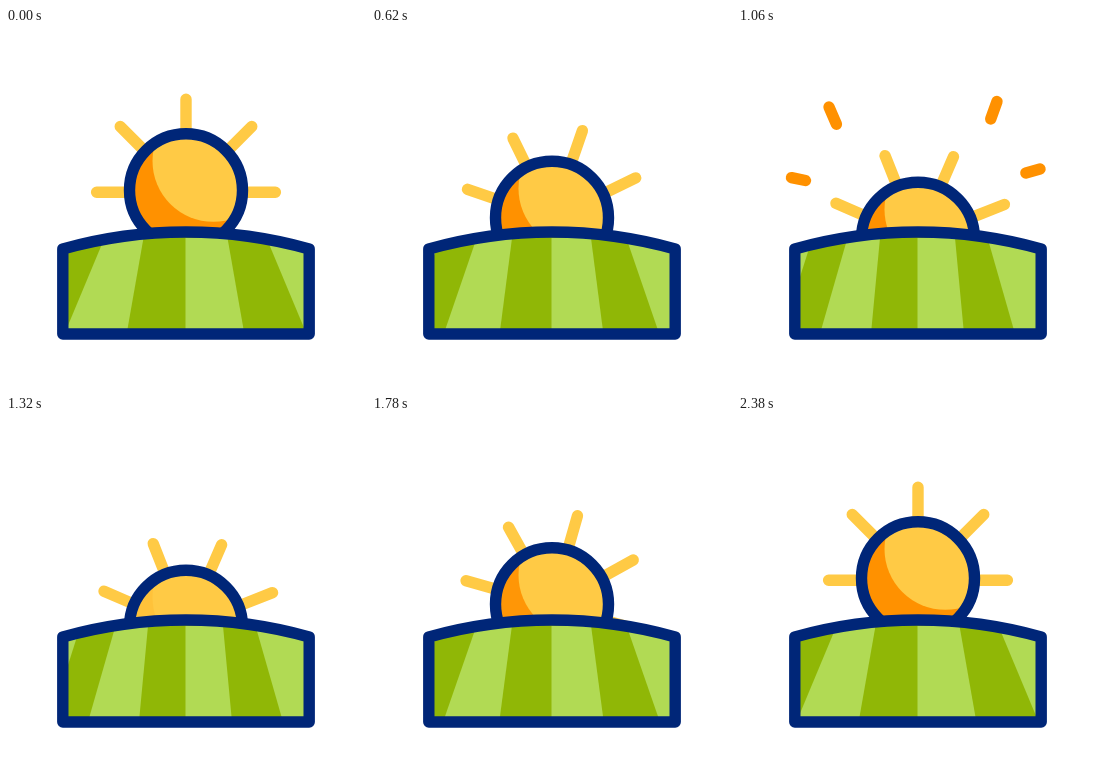
An HTML page with a canvas for the animation above (2.4 s loop, 360 by 360 pixels).

```html
<!DOCTYPE html>
<html lang="en">
<head>
<meta charset="utf-8">
<title>Sun over a field</title>
<style>
  html, body { margin: 0; width: 100%; height: 100%; overflow: hidden; background: #fff; }
  canvas { display: block; width: 100vw; height: 100vh; }
</style>
</head>
<body>
<canvas id="stage"></canvas>
<script>
const SIZE = 360, LOOP = 2400, PHASE = 6, LINE = 11.4, MID = 180;
const NAVY = '#002678', YELLOW = '#ffca45', ORANGE = '#ff9100';
const LIGHT = '#b1da54', DARK = '#90b706';

const canvas = document.getElementById('stage');
const ctx = canvas.getContext('2d');
const ratio = window.devicePixelRatio || 1;
canvas.width = canvas.height = SIZE * ratio;
ctx.scale(ratio, ratio);
ctx.lineCap = ctx.lineJoin = 'round';
ctx.lineWidth = LINE;

const lerp = (a, b, t) => a + (b - a) * t;
const clamp = t => Math.min(1, Math.max(0, t));
const cubicInOut = t => t < 0.5 ? 4 * t ** 3 : 1 - 4 * (1 - t) ** 3;
const smooth = (from, to, time) => {
  const t = clamp((time - from) / (to - from));
  return t * t * (3 - 2 * t);
};

// Sparks: inner point, then outer point
const SPARKS = [
  [89, 157, 53.5, 149.6],
  [110, 123, 91, 79],
  [243, 118, 259, 73.5],
  [266, 151, 302, 141]
];

function line(x1, y1, x2, y2, color) {
  ctx.strokeStyle = color;
  ctx.beginPath();
  ctx.moveTo(x1, y1);
  ctx.lineTo(x2, y2);
  ctx.stroke();
}

function disc(x, y, radius, color) {
  ctx.fillStyle = color;
  ctx.beginPath();
  ctx.arc(x, y, radius, 0, 2 * Math.PI);
  ctx.fill();
}

// The three rays that start on top are a little longer
function drawRays(y, turn) {
  for (let i = 0; i < 8; i++) {
    const angle = turn + i * Math.PI / 4;
    const c = Math.cos(angle), s = Math.sin(angle);
    const reach = i > 4 ? 93 : 89.4;
    line(MID + 60 * c, y + 60 * s, MID + reach * c, y + reach * s, YELLOW);
  }
}

function drawSparks(time) {
  const head = smooth(640, 1000, time), tail = smooth(860, 1220, time);
  if (head <= tail) return;
  for (const [x1, y1, x2, y2] of SPARKS) {
    line(lerp(x1, x2, tail), lerp(y1, y2, tail),
         lerp(x1, x2, head), lerp(y1, y2, head), ORANGE);
  }
}

function drawSun(y, shadeFade) {
  disc(MID, y, 56.5, ORANGE);
  ctx.save();
  ctx.globalAlpha = shadeFade;
  disc(MID, y, 56.5, YELLOW);
  ctx.globalAlpha = 1;
  ctx.clip();
  disc(MID + 27.3, y - 29.3, 60.8, YELLOW);
  ctx.restore();
  ctx.strokeStyle = NAVY;
  ctx.beginPath();
  ctx.arc(MID, y, 56.5, 0, 2 * Math.PI);
  ctx.stroke();
}

function fieldPath() {
  const half = 123.2, rise = 17, radius = (half ** 2 + rise ** 2) / (2 * rise);
  const spread = Math.asin(half / radius);
  ctx.beginPath();
  ctx.moveTo(MID - half, 306);
  ctx.arc(MID, 204 + radius, radius, -Math.PI / 2 - spread, -Math.PI / 2 + spread);
  ctx.lineTo(MID + half, 306);
  ctx.closePath();
}

function stripe(top1, bottom1, top2, bottom2) {
  ctx.fillStyle = LIGHT;
  ctx.beginPath();
  ctx.moveTo(MID - 0.5 + top1, 210);
  ctx.lineTo(MID - 0.5 + top2, 210);
  ctx.lineTo(MID - 0.5 + bottom2, 301);
  ctx.lineTo(MID - 0.5 + bottom1, 301);
  ctx.fill();
}

function drawField(depth) {
  const innerTop = lerp(42, 37.5, depth), innerBottom = lerp(58, 46, depth);
  const outerTop = lerp(81, 70, depth), outerBottom = lerp(119, 96, depth);
  const edgeTop = lerp(118, 105, depth), edgeBottom = lerp(160, 134, depth);

  fieldPath();
  ctx.fillStyle = DARK;
  ctx.fill();
  ctx.save();
  ctx.clip();
  stripe(-140, -180, -edgeTop, -edgeBottom);
  stripe(-outerTop, -outerBottom, -innerTop, -innerBottom);
  stripe(0, 0, innerTop, innerBottom);
  stripe(outerTop, outerBottom, 140, 140);
  ctx.restore();
  fieldPath();
  ctx.strokeStyle = NAVY;
  ctx.stroke();
}

function draw(now) {
  const time = (now + PHASE) % LOOP;
  const half = LOOP / 2;
  const depth = cubicInOut(time < half ? time / half : 2 - time / half);
  const sunY = lerp(162.3, 211, depth);
  const shadeFade = 0.85 * smooth(1150, 1250, time) * (1 - smooth(1350, 1900, time));

  ctx.fillStyle = '#fff';
  ctx.fillRect(0, 0, SIZE, SIZE);
  drawRays(sunY + 2 * (1 - depth), depth * 114 * Math.PI / 180);
  drawSparks(time);
  drawSun(sunY, shadeFade);
  drawField(depth);
}

let start;
function tick(now) {
  start ??= now;
  draw(now - start);
  requestAnimationFrame(tick);
}
draw(0);
requestAnimationFrame(tick);
</script>
</body>
</html>
```
